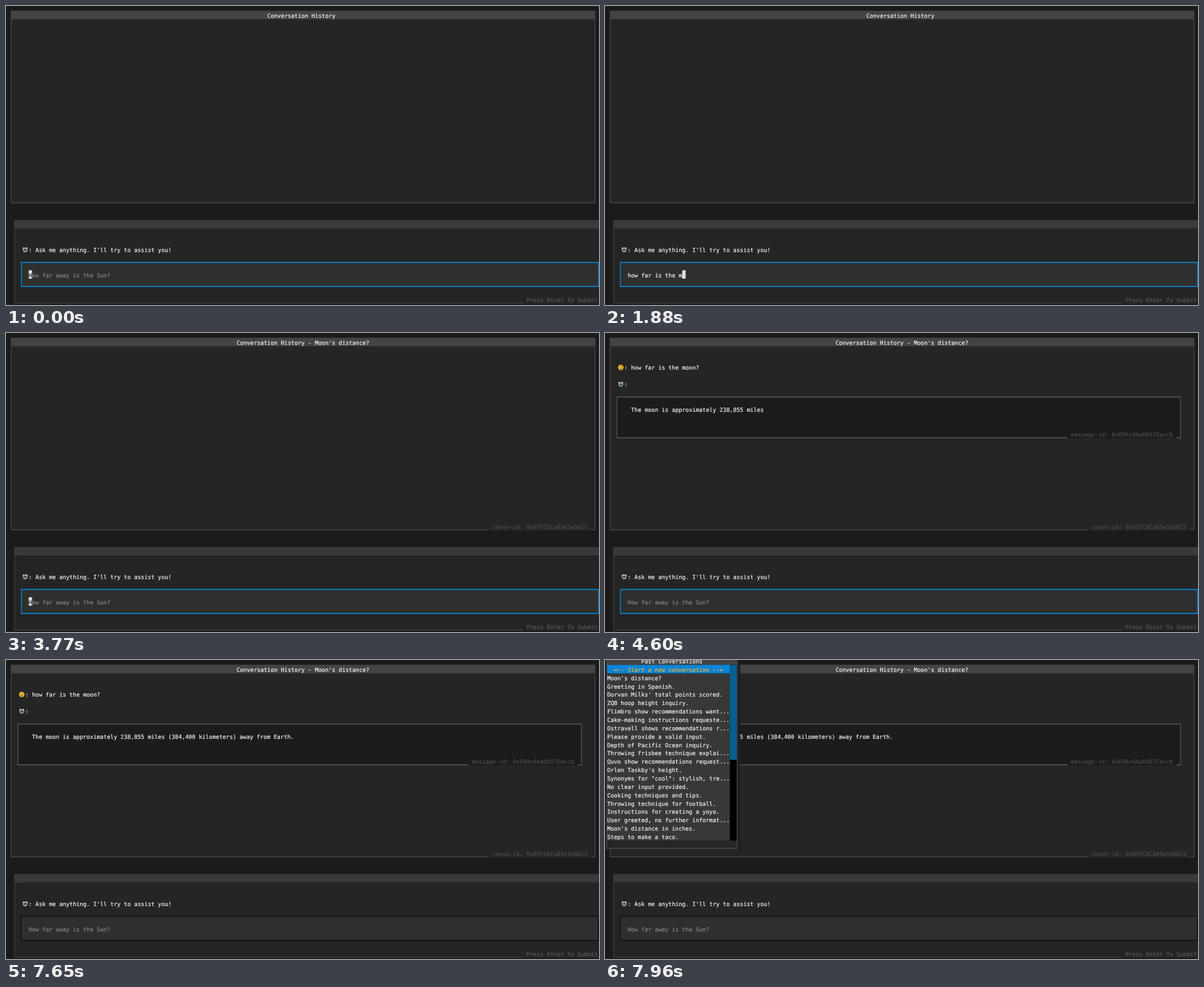
An HTML page for the animation above (8000 ms loop, 1054 by 531 pixels).

```html
<!DOCTYPE html>
<html lang="en">
<head>
<meta charset="utf-8">
<title>Terminal chat</title>
<style>
  html, body { margin: 0; width: 100%; height: 100%; overflow: hidden; background: #1b1b1b; }
  svg { position: absolute; left: 0; top: 0; }
  text {
    --ink: #f2f2f2;
    font: 10.06px "DejaVu Sans Mono", monospace;
    text-rendering: geometricPrecision;
    font-variant-ligatures: none;
    fill: var(--ink);
    stroke: var(--ink);
    stroke-width: .22px;
  }
  .dim { --ink: #4d4d4d; }
  .hint { --ink: #585858; }
  .placeholder { --ink: #858585; }
  .pick { --ink: #ffb02e; font-style: italic; }
</style>
</head>
<body>
<svg id="stage" width="1054" height="531" viewBox="0 0 1054 531"></svg>
<script>
// Everything sits on a terminal grid of character cells
const CELL = 6.06, ROW = 14.86, LEFT = 3.9, TOP = -6.2, BASELINE = 12.2;
const SIDE = CELL / 4, EDGE = ROW / 8, LOOP = 8000;
const PANEL = '#252525';
const stage = document.getElementById('stage');
const colX = c => LEFT + c * CELL;
const rowY = r => TOP + r * ROW;

function add(parent, tag, attrs = {}) {
  const el = document.createElementNS('http://www.w3.org/2000/svg', tag);
  for (const k in attrs) el.setAttribute(k, attrs[k]);
  return parent.appendChild(el);
}
const group = parent => add(parent, 'g');

function rect(parent, x0, y0, x1, y1, fill) {
  return add(parent, 'rect', { x: x0, y: y0, width: x1 - x0, height: y1 - y0, fill });
}
const cells = (parent, c0, r0, c1, r1, fill) =>
  rect(parent, colX(c0), rowY(r0), colX(c1), rowY(r1), fill);

// Bordered box: the side lines lie just outside the columns
function panel(parent, c0, r0, c1, r1, line, fill) {
  const frame = rect(parent, colX(c0) - SIDE, rowY(r0), colX(c1) + SIDE, rowY(r1), line);
  rect(parent, colX(c0), rowY(r0) + EDGE, colX(c1), rowY(r1) - EDGE, fill);
  return frame;
}
function text(parent, col, row, str, cls = '') {
  const el = add(parent, 'text', { x: colX(col), y: rowY(row) + BASELINE, class: cls });
  el.textContent = str;
  return el;
}
function icon(parent, x, row, shapes) {
  const g = add(parent, 'g', { transform: `translate(${x} ${rowY(row) + 3})` });
  g.innerHTML = shapes;
}
const robot = (parent, x, row) => icon(parent, x, row, `
  <path d="M.8 2H9.2V5.4Q8.2 9.4 5 9.4Q1.8 9.4 .8 5.4Z" fill="#cfd8d9"/>
  <path d="M1 2.4L2.4 .6L3.8 2.4ZM6.2 2.4L7.6 .6L9 2.4Z" fill="#f3f3f3"/>
  <path d="M3.2 1.2H6.8V2.4H3.2Z" fill="#e0653f"/>
  <path d="M1.8 3.3H8.2V5.6Q7.4 8.2 5 8.2Q2.6 8.2 1.8 5.6Z" fill="#27363b"/>
  <path d="M2.8 3.9H4.2V5.2H2.8ZM5.8 3.9H7.2V5.2H5.8ZM3.5 6.5H6.5V7.3H3.5Z" fill="#6cc5d2"/>`);
const grin = (parent, x, row) => icon(parent, x, row, `
  <circle cx="5" cy="5" r="4.8" fill="#fcc21b"/>
  <path d="M2.7 2.8H4V4.4H2.7ZM6 2.8H7.3V4.4H6Z" fill="#4a3a20"/>
  <path d="M2 5.5H8Q7.4 8.3 5 8.3Q2.6 8.3 2 5.5Z" fill="#5b3a22"/>
  <path d="M2.3 5.5H7.7L7.4 6.4H2.6Z" fill="#fff"/>`);

// Conversation history
panel(stage, 1, 1, 172, 24, '#444', PANEL);
cells(stage, 1, 1, 172, 2, '#444');
const title = text(stage, 76, 1, '');
const convo = group(stage);
cells(convo, 141, 23, 171, 24, PANEL);
text(convo, 142, 23, 'convo-id: 0x02FCbCa85e1ebbC5', 'dim');

// Messages
const chat = group(stage);
grin(chat, 23, 4);
text(chat, 5, 4, ': how far is the moon?');
robot(chat, 23, 6);
text(chat, 5, 6, ':');
const shortBox = group(chat);
panel(shortBox, 3, 8, 168, 11, '#505050', '#1c1c1c');
const fullBox = group(chat);
panel(fullBox, 3, 8, 168, 13, '#505050', '#1c1c1c');
cells(fullBox, 135, 12, 167, 13, '#1c1c1c');
text(fullBox, 136, 12, 'message-id: 0xE0Ac6AabD07Eaccb', 'dim');
const answer = text(chat, 7, 9, '');

// Prompt
panel(stage, 2, 26, 180, 36, '#3a3a3a', PANEL);
cells(stage, 2, 26, 180, 27, '#3a3a3a');
robot(stage, 29.1, 29);
text(stage, 6, 29, ": Ask me anything. I'll try to assist you!");
cells(stage, 151, 35, 180, 36, PANEL);
text(stage, 152, 35, 'Press Enter To Submit', 'hint');
const border = panel(stage, 4, 31, 173, 34, '#0985d6', '#2f2f2f');
const cursor = cells(stage, 6, 32, 7, 33, '#e0e0e0');
const typed = text(stage, 6, 32, '');
const hint = group(stage);
const firstLetter = text(hint, 6, 32, 'H', 'placeholder');
text(hint, 7, 32, 'ow far away is the Sun?', 'placeholder');

// Past conversations
const sidebar = group(stage);
const past = [
  "Moon's distance?", 'Greeting in Spanish.', "Dorvan Milks' total points scored.",
  'ZQB hoop height inquiry.', 'Flimbro show recommendations want...',
  'Cake-making instructions requeste...', 'Ostravell shows recommendations r...',
  'Please provide a valid input.', 'Depth of Pacific Ocean inquiry.',
  'Throwing frisbee technique explai...', 'Quvo show recommendations request...',
  "Orlen Taskby's height.", 'Synonyms for "cool": stylish, tre...',
  'No clear input provided.', 'Cooking techniques and tips.',
  'Throwing technique for football.', 'Instructions for creating a yoyo.',
  'User greeted, no further informat...', "Moon's distance in inches.", 'Steps to make a taco.'
];
rect(sidebar, 0, 0, colX(39), rowY(23), '#1e1e1e');
panel(sidebar, 0, 0, 38, 23, '#484848', '#262626');
cells(sidebar, 0, 0, 38, 1, '#444');
cells(sidebar, 0, 1, 36, 22, '#383838');
cells(sidebar, 0, 1, 36, 2, '#0985d6');
cells(sidebar, 36, 1, 38, 22, '#000');
cells(sidebar, 36, 1, 38, 12.35, '#04608f');
text(sidebar, 10, 0, 'Past Conversations');
text(sidebar, 2, 1, '<-- Start a new conversation -->', 'pick');
past.forEach((line, i) => text(sidebar, 0, i + 2, line));

// Timeline
const question = 'how far is the moon?';
const reply = 'The moon is approximately 238,855 miles (384,400 kilometers) away from Earth.';
const keys = [[0, 0], [860, 1], [920, 2],
  ...[3, 4, 6, 7, 8, 10, 11, 12, 14, 15].map((n, i) => [1070 + i * 750 / 9, n]),
  [1880, 16], [2000, 17], [2150, 18], [2210, 19], [2360, 20], [2570, 0]];
const blinks = [370, 860, 3280, 3770, 4290, 4750, 5270, 5740, 6230, 6730, 7220];
const replies = [[0, 0], [4140, 3], [4600, 39], [5180, reply.length]];
const borders = [[0, '#0985d6'], [7590, '#104a72'], [7650, '#121212']];
const slide = [[0, -241], [7900, -110], [7960, 0]];

const at = (steps, t) => steps.filter(s => s[0] <= t + 0.01).pop()[1];
const show = (el, on) => { el.style.display = on ? '' : 'none'; };

function render(t) {
  const count = at(keys, t);
  const blinkOn = blinks.filter(b => b <= t).length % 2 === 0;
  typed.textContent = question.slice(0, count);
  show(hint, count === 0);
  firstLetter.style.setProperty('--ink', blinkOn ? '#333' : '#858585');
  cursor.setAttribute('x', colX(6 + count));
  show(cursor, blinkOn);
  border.setAttribute('fill', at(borders, t));

  const named = t >= 3370;
  title.textContent = 'Conversation History' + (named ? " - Moon's distance?" : '');
  title.setAttribute('x', colX(named ? 67 : 76));
  show(convo, named);

  const full = t >= 4600;
  show(chat, t >= 4140);
  show(shortBox, !full);
  show(fullBox, full);
  answer.textContent = reply.slice(0, at(replies, t));

  sidebar.setAttribute('transform', `translate(${at(slide, t)} 0)`);
}

const start = performance.now();
function tick() {
  render((performance.now() - start) % LOOP);
  requestAnimationFrame(tick);
}
render(0);
requestAnimationFrame(tick);
</script>
</body>
</html>
```
